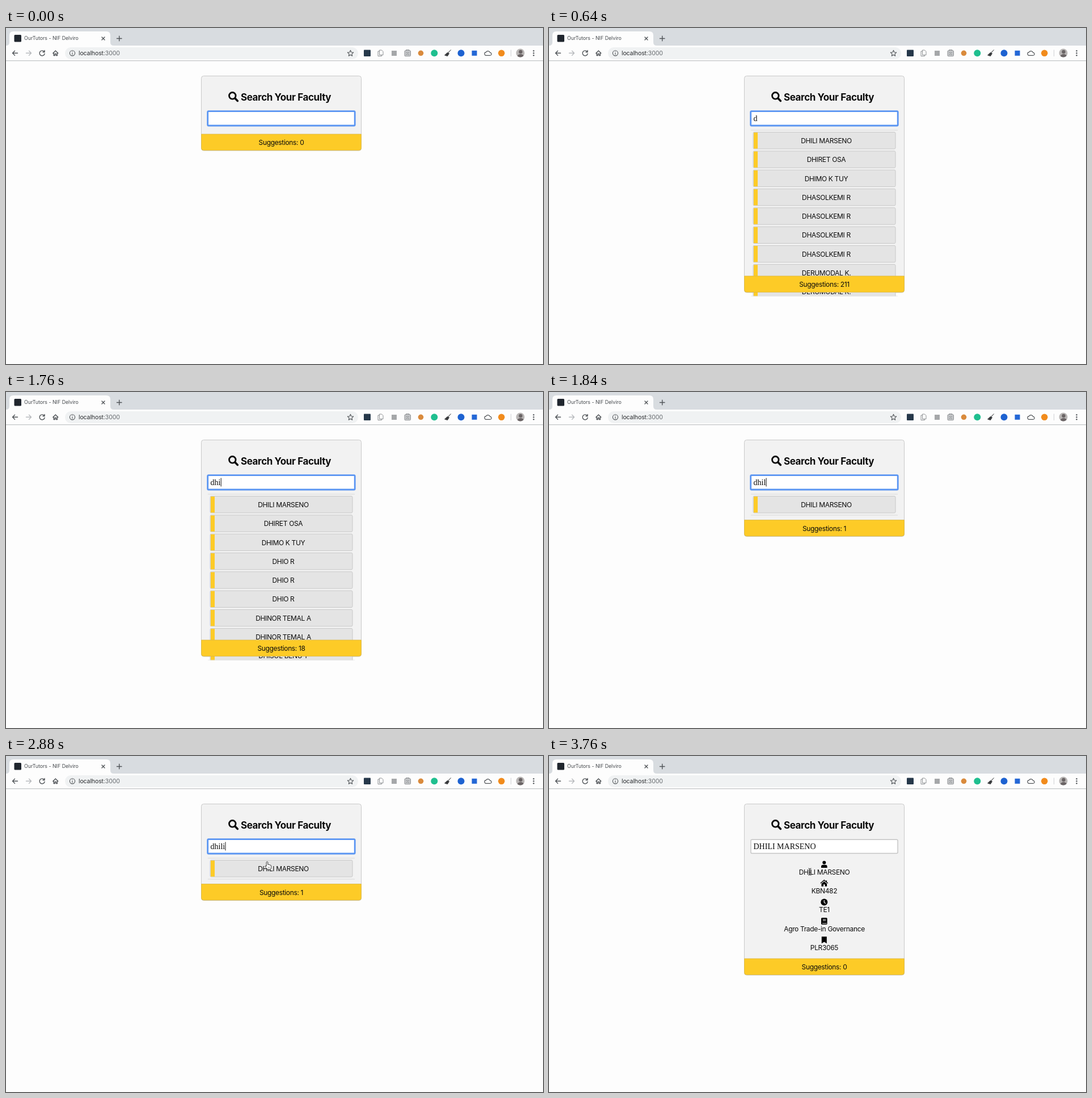
Animation of 947 by 592 pixels, one loop 3840 ms. Source, as an HTML page:

```html
<!DOCTYPE html>
<html lang="en">
<head>
<meta charset="utf-8">
<title>Tutor search</title>
<style>
html, body { margin: 0; width: 100%; height: 100%; overflow: hidden; background: #fdfdfd; }
svg { display: block; width: 947px; height: 592px; }
text { font-family: Inter, "Open Sans", sans-serif; fill: #0b0b0b; white-space: pre; }
.body { font-size: 12px; letter-spacing: -.35px; text-anchor: middle; }
.head { font-size: 17px; font-weight: 700; letter-spacing: -.4px; }
.typed { font: 14px "Liberation Serif", Times, serif; }
.tab { font-size: 8.8px; fill: #45494d; }
.url { font-size: 10.6px; letter-spacing: -.15px; fill: #2a2c2f; }
.line { fill: none; stroke: #505458; stroke-width: 1.4; stroke-linecap: round; stroke-linejoin: round; }
.thin { fill: none; stroke: #8d9093; stroke-width: 1; stroke-linejoin: round; }
.rule { stroke: #d9d9d9; }
.item { fill: #e4e4e4; stroke: #c8c8c8; }
.gold { fill: #fdcb27; }
</style>
</head>
<body>
<svg viewBox="0 0 947 592">
  <defs>
    <clipPath id="listClip"><rect x="344" y="176" width="283" height="296.5"/></clipPath>
    <clipPath id="faceClip"><circle cx="907" cy="44" r="7.5"/></clipPath>
  </defs>
  <rect width="947" height="592" fill="#fdfdfd"/>

  <!-- tab strip -->
  <rect width="947" height="31" fill="#d8dce0"/>
  <path d="M0 31q6 0 6-6V13q0-7 7-7H177q7 0 7 7V25q0 6 6 6z" fill="#fdfdfd"/>
  <rect x="14.5" y="12" width="12.5" height="12.5" rx="1.5" fill="#20262e"/>
  <text class="tab" x="32" y="21.3">OurTutors - NIF Delviro</text>
  <path class="line" d="M169 16l5 5m0-5l-5 5M195.500 18.500h8.500m-4.250-4.250v8.500"/>

  <!-- toolbar -->
  <rect y="31" width="947" height="26.500" fill="#fdfdfd"/>
  <path d="M0 57.700H947" stroke="#c3c5c7" stroke-width="1.300"/>
  <path class="line" d="M20.500 44.300h-9m4-4l-4 4 4 4"/>
  <path class="line" style="stroke:#b7babd" d="M35.500 44.300h9m-4-4l4 4-4 4"/>
  <path class="line" d="M67.300 41.700a4.500 4.500 0 1 0 .8 3.600M68 39.500v3h-3"/>
  <path class="line" d="M82.800 44.500l4.500-4.400 4.500 4.400M84.200 43.800v4.700h2v-3h2.200v3h2v-4.700"/>
  <rect x="104" y="34" width="517" height="21" rx="10.500" fill="#f0f2f3"/>
  <g class="line" style="stroke-width:1.100">
    <circle cx="117" cy="44.300" r="4.600"/>
    <path d="M117 44v2.600M117 41.900v.1"/>
  </g>
  <text class="url" x="128" y="48.200">localhost<tspan fill="#666a6e">:3000</tspan></text>
  <path class="line" style="stroke-width:1.100" d="M607.500 39.300l1.500 3.400 3.700.4-2.800 2.500.8 3.600-3.200-1.900-3.200 1.900.8-3.600-2.800-2.500 3.700-.4z"/>

  <!-- extensions -->
  <rect x="631" y="38.500" width="12" height="11.500" rx="1" fill="#26384a"/>
  <path class="thin" d="M658.500 39h4l2.500 2.500v6h-6.500zM658 41h-2v8.500h6.500v-2"/>
  <rect x="680" y="40" width="9" height="9" fill="#a5a7a9"/>
  <g class="thin">
    <rect x="703" y="40" width="10.500" height="9.500" rx="1" fill="#c9cbcd"/>
    <path d="M705.500 40v-1.500h5.500v1.500M705 43.500h6.500M705 46.500h2.500l1-1.500 1 2 2-.5"/>
  </g>
  <circle cx="731.500" cy="44.300" r="4.800" fill="#d98a3c"/>
  <circle cx="755.300" cy="44.300" r="6" fill="#1fbf8f"/>
  <path d="M784.500 38.500l-4.500 5 1.500 1.500-3 4.500-5-1.500 4.500-4.500 1.200.3z" fill="#37393b" stroke="#37393b" stroke-width=".8"/>
  <circle cx="802.500" cy="44.300" r="6" fill="#1d62d1"/>
  <rect x="821.500" y="39.800" width="9" height="9" fill="#2467d6"/>
  <path class="line" style="stroke-width:1.200" d="M847 48.300h6.500a2.500 2.500 0 0 0 .2-5 3.900 3.900 0 0 0-7.200-.6 2.800 2.800 0 0 0 .5 5.600z"/>
  <circle cx="873.700" cy="44.300" r="5.800" fill="#f18b1c"/>
  <path d="M890.500 38.500v11.500" stroke="#d0d2d4"/>
  <g clip-path="url(#faceClip)">
    <rect x="899" y="36" width="16" height="16" fill="#b9b6b5"/>
    <circle cx="907.500" cy="42" r="3.200" fill="#6a6465"/>
    <ellipse cx="907.500" cy="51" rx="6" ry="5" fill="#6a6465"/>
  </g>
  <g fill="#505458">
    <circle cx="930.500" cy="40.300" r="1.200"/><circle cx="930.500" cy="44.300" r="1.200"/><circle cx="930.500" cy="48.300" r="1.200"/>
  </g>

  <!-- search card -->
  <rect id="card" x="344.500" y="84.500" width="282" height="131" rx="4" fill="#f2f2f2" stroke="#c9c9c9"/>
  <g fill="none" stroke="#0b0b0b">
    <circle cx="399.300" cy="119.300" r="5.800" stroke-width="2.800"/>
    <path d="M403.800 123.800l4.600 4.600" stroke-width="3.500" stroke-linecap="round"/>
  </g>
  <text class="head" x="414" y="128">Search Your Faculty</text>
  <rect id="field" fill="#fff"/>
  <text id="typed" class="typed" x="360.500" y="163.700"></text>
  <path id="caret" d="M0 151.500v15" stroke="#111"/>
  <g id="content"></g>
  <path id="foot" class="gold" stroke="#d9b544" stroke-width=".8"/>
  <text id="count" class="body" x="485.500"></text>

  <g id="hand">
    <path d="M-1.300 1.200q0-1.500 1.300-1.500t1.300 1.500v3.600q1.500-.7 2.100.4 1.500-.5 2 .6 1.700-.3 1.700 1.500v2.500q0 1.700-1.300 3.700h-5q-2.300-2.600-4-4.800-.8-1.400.4-1.800.8-.2 1.500 1z" fill="#fff" stroke="#222" stroke-width=".9" stroke-linejoin="round"/>
    <path d="M2 8.500v3M4 8.500v3" stroke="#555" stroke-width=".6"/>
  </g>
  <path id="beam" d="M457.500 198q2.500 0 2.500 1.500 0-1.500 2.500-1.500M460 199.500v9M457.500 210q2.500 0 2.500-1.500 0 1.500 2.500 1.500M458.500 205h3" fill="none" stroke="#222" stroke-width="1"/>
</svg>
<script>
const LOOP = 3840, PITCH = 33.3, BLINK = 800;
const $ = id => document.getElementById(id);
const label = (s, x, y) => `<text class="body" x="${x}" y="${y}">${s}</text>`;
const rule = y => `<path class="rule" d="M356 ${y}H615"/>`;
const times = (n, s) => Array(n).fill(s);

const MAIN = "DHILI MARSENO";
const top3 = [MAIN, "DHIRET OSA", "DHIMO K TUY"];
const wide = [...top3, ...times(4, "DHASOLKEMI R")];
const all = [...wide, ...times(2, "DERUMODAL K.")];
const mid = [...wide, ...times(2, "DHIBAREN T")];
const few = [...top3, ...times(3, "DHIO R"), ...times(2, "DHINOR TEMAL A"), "DHISOL BENU T"];

const icons = [
  '<circle cy="-3.200" r="3"/><path d="M-5.300 6V4q0-3.200 3.200-3.200h4.200q3.200 0 3.200 3.200v2z"/>',
  '<path d="M-6.500 0L0-5.500 6.500 0M4-5v3" fill="none" stroke="#0b0b0b" stroke-width="1.500"/><path d="M-4.800 .6L0-3.400 4.800 .6V5.500H1.300V2H-1.300V5.500H-4.800z"/>',
  '<circle r="6"/><path d="M0-3.600V.4l2.500 1.800" fill="none" stroke="#f2f2f2" stroke-width="1.300"/>',
  '<rect x="-5.300" y="-6" width="10.600" height="12" rx="1.600"/><path d="M-2.500-3h5.500M-2.500-.8h5.500M-3.500 4h7.800" stroke="#f2f2f2"/>',
  '<path d="M-4.500-6h9V6L0 3.200-4.500 6z"/>'
];
const details = [MAIN, "KBN482", "TE1", "Agro Trade-in Governance", "PLR3065"];

function listView(names) {
  const rows = names.map((name, i) => {
    const y = 183.5 + i * PITCH;
    return `<rect class="item" x="360" y="${y}" width="251" height="29.500" rx="2"/>
      <rect class="gold" x="361" y="${y + .7}" width="7" height="28.300"/>` + label(name, 489, y + 19.4);
  }).join("");
  const end = names.length > 1 ? 472.3 : 217;
  return `${rule(180)}<g clip-path="url(#listClip)">${rows}${rule(end)}</g>`;
}

const detailView = () => details.map((s, i) =>
  `<g transform="translate(485.300 ${191 + i * PITCH})">${icons[i]}</g>` + label(s, 485.5, 208.7 + i * PITCH)).join("");

// at: start in ms, foot: top of the yellow bar
const steps = [
  { at: 0, typed: "", count: 0, foot: 187, view: "" },
  { at: 80, typed: "d", count: 211, foot: 437, view: listView(all) },
  { at: 1600, typed: "dh", count: 64, foot: 437, view: listView(mid) },
  { at: 1680, typed: "dhi", count: 18, foot: 437, view: listView(few) },
  { at: 1840, typed: "dhil", count: 1, foot: 225.5, view: listView([MAIN]) },
  { at: 1920, typed: "dhili", count: 1, foot: 225.5, view: listView([MAIN]) },
  { at: 3120, typed: MAIN, count: 0, foot: 357, view: detailView(), done: true }
];

function setAttrs(id, attrs) {
  for (const k in attrs) $(id).setAttribute(k, attrs[k]);
}

let shown, caretX;
function show(step) {
  shown = step;
  const { foot, done } = step;
  $("content").innerHTML = step.view;
  $("typed").textContent = step.typed;
  $("count").textContent = "Suggestions: " + step.count;
  setAttrs("count", { y: foot + 19.2 });
  setAttrs("card", { height: foot - 55.5 });
  setAttrs("foot", { d: `M344.500 ${foot}h282v24.500q0 4-4 4h-274q-4 0-4-4z` });
  setAttrs("field", done
    ? { x: 356, y: 147.2, width: 259, height: 24.3, rx: 2, stroke: "#c4c4c4", "stroke-width": 1.4 }
    : { x: 355.7, y: 146.7, width: 259.5, height: 25.3, rx: 1.5, stroke: "#5a95f2", "stroke-width": 2.8 });
  caretX = 361.3 + $("typed").getComputedTextLength();
  setAttrs("caret", { transform: `translate(${caretX})` });
}

const toggle = (id, on) => { $(id).style.display = on ? "" : "none"; };

function draw(now) {
  const t = now % LOOP;
  const step = steps.findLast(s => s.at <= t);
  if (step !== shown) show(step);
  toggle("caret", step.typed && !step.done && (t - step.at) % BLINK < BLINK / 2);
  toggle("hand", t >= 2800 && !step.done);
  toggle("beam", step.done);
  // the pointer settles on the first row, one move per tick
  const tick = Math.min(2, Math.max(0, Math.floor((t - 2800) / 80)));
  setAttrs("hand", { transform: `translate(${461 - tick * .5} ${179 + tick * 7.5})` });
  requestAnimationFrame(draw);
}
draw(performance.now());
</script>
</body>
</html>
```
